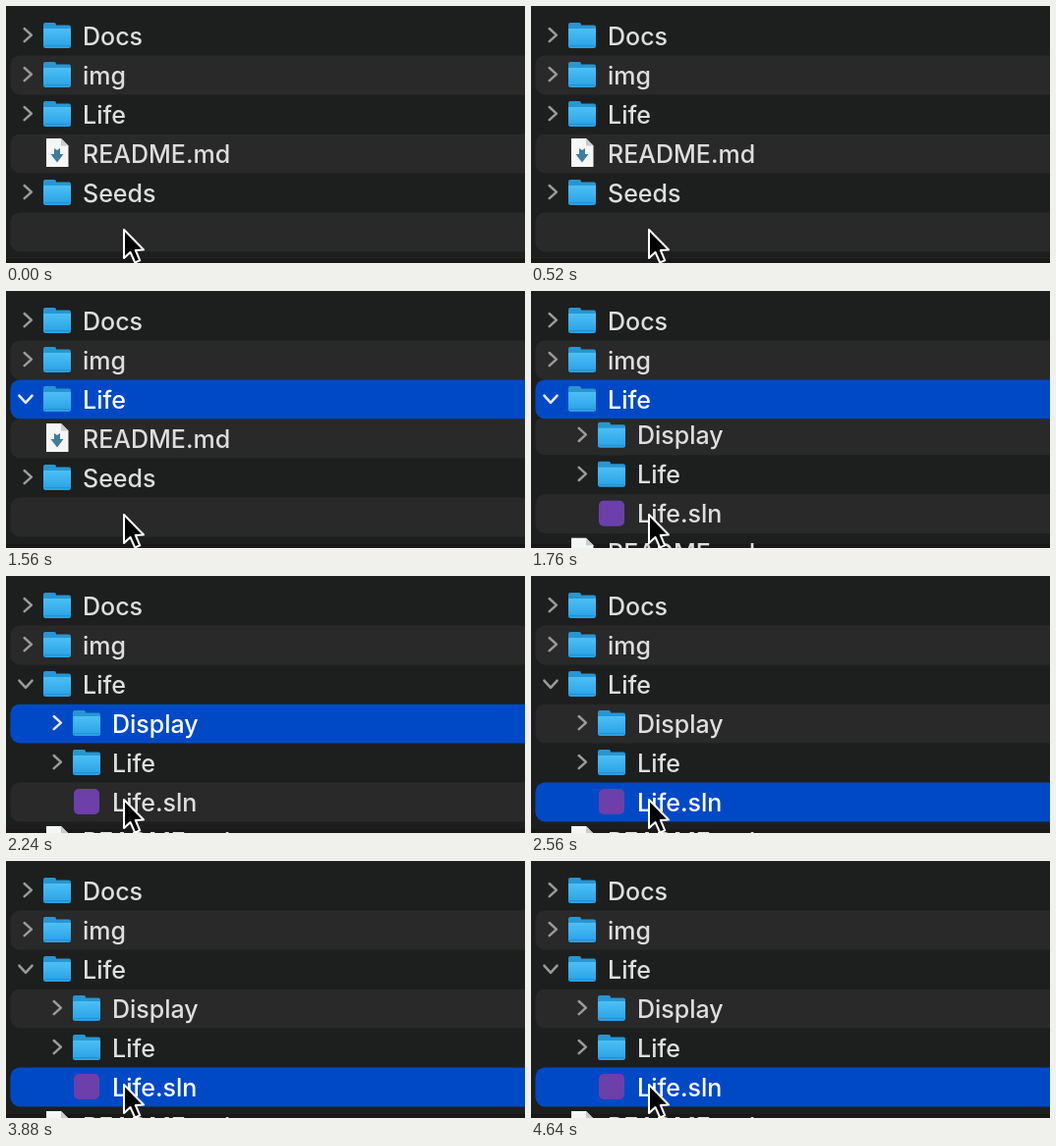
Animation of 528x262 px, one loop 4.72 s. Source, as an HTML page with a canvas:

```html
<!DOCTYPE html>
<html lang="en">
<head>
<meta charset="utf-8">
<title>File tree</title>
<style>
  html, body { margin: 0; overflow: hidden; background: #1d1f1e; }
  canvas { display: block; }
</style>
</head>
<body>
<canvas width="528" height="262"></canvas>
<script>
const ctx = document.querySelector('canvas').getContext('2d');
const LOOP = 4720, ROW = 40, TOP = 10;
const OPEN = 1520, EXPAND = 1580, EXPAND_TIME = 202, KEY_REPEAT = 180;

const item = (name, icon = 'folder', depth = 0) => ({ name, icon, depth });
const head = [item('Docs'), item('img'), item('Life')];
const children = [item('Display', 'folder', 1), item('Life', 'folder', 1), item('Life.sln', 'solution', 1)];
const tail = [item('README.md', 'page'), item('Seeds')];

const pagePath = new Path2D('M41 5h15l7.5 7.5V34H41z');
const foldPath = new Path2D('M56 5l7.5 7.5H56z');
const arrowPath = new Path2D('M49 15l3 2 3-2v6h3.5L52 29.5 45.5 21H49z');
const cursorPath = new Path2D('M120 228v29l6.5-6 4.7 10.5 5-2.2L131.8 249l8.2-.5z');

function fill(path, color) {
  ctx.fillStyle = color;
  ctx.fill(path);
}

function box(x, y, w, h, r, color) {
  const path = new Path2D();
  path.roundRect(x, y, w, h, r);
  fill(path, color);
}

function chevron(open, selected) {
  ctx.save();
  ctx.translate(open ? 20 : 22.3, open ? 20.2 : 19.6);
  if (open) ctx.rotate(Math.PI / 2);
  ctx.strokeStyle = selected ? '#e4e9f4' : '#999a99';
  ctx.lineWidth = 2.5;
  ctx.stroke(new Path2D('M-3.6-6.6L3.6 0l-7.2 6.6'));
  ctx.restore();
}

const icons = {
  folder() {
    box(38, 7, 13, 8, 2, '#2896d2');
    box(38, 9.5, 28, 10, 2, '#2896d2');
    const shade = ctx.createLinearGradient(0, 13, 0, 33);
    shade.addColorStop(0, '#4dbff5');
    shade.addColorStop(1, '#27a0e6');
    box(38, 13, 28, 20, [1, 1, 2.5, 2.5], shade);
    box(39, 30, 26, 1, 0, '#2490cf');
  },
  page() {
    fill(pagePath, '#f5f6f6');
    fill(foldPath, '#c9cccd');
    fill(arrowPath, '#3f7d9c');
  },
  solution() {
    box(39, 7, 26, 26, 5, '#6d3fa9');
  }
};

function drawRow(entry, index, y, selected, open) {
  if (selected || index % 2) box(4.4, y + 0.4, 540, ROW, 10, selected ? '#0049c6' : '#292929');
  if (!entry) return;
  ctx.save();
  ctx.translate(entry.depth * 30, y);
  if (entry.icon === 'folder') chevron(open, selected);
  icons[entry.icon]();
  ctx.fillStyle = selected ? '#fff' : '#dddedd';
  ctx.fillText(entry.name, 78, 29.5);
  ctx.restore();
}

// Three repeated "down" presses, the first one KEY_REPEAT after `start`
const presses = (t, start) => Math.min(3, Math.max(0, Math.floor((t - start) / KEY_REPEAT)));

function draw(t) {
  const linear = Math.min(1, Math.max(0, (t - EXPAND) / EXPAND_TIME));
  const progress = (1 - Math.cos(Math.PI * linear)) / 2;
  const expanded = linear > 0;
  const shift = expanded ? children.length * ROW * (progress - 1) : 0;
  const selected = presses(t, 420) + presses(t, 1940) - 1;
  const below = [...(expanded ? children : []), ...tail, null, null];

  box(0, 0, 528, 262, 0, '#1d1f1e');
  box(0, 258, 528, 4, 0, '#1a1718');

  head.forEach((entry, i) =>
    drawRow(entry, i, TOP + i * ROW, i === selected, i === 2 && t >= OPEN));

  const splitY = TOP + head.length * ROW;
  ctx.save();
  ctx.beginPath();
  ctx.rect(0, splitY + 0.4, 528, 262);
  ctx.clip();
  below.forEach((entry, i) => {
    const index = i + head.length;
    drawRow(entry, index, TOP + index * ROW + shift, index === selected);
  });
  ctx.restore();

  fill(cursorPath, '#000');
  ctx.strokeStyle = '#fff';
  ctx.lineWidth = 2;
  ctx.stroke(cursorPath);
}

ctx.font = '500 25px Inter, sans-serif';
ctx.lineCap = ctx.lineJoin = 'round';

function tick() {
  draw(performance.now() % LOOP);
  requestAnimationFrame(tick);
}
tick();
</script>
</body>
</html>
```
